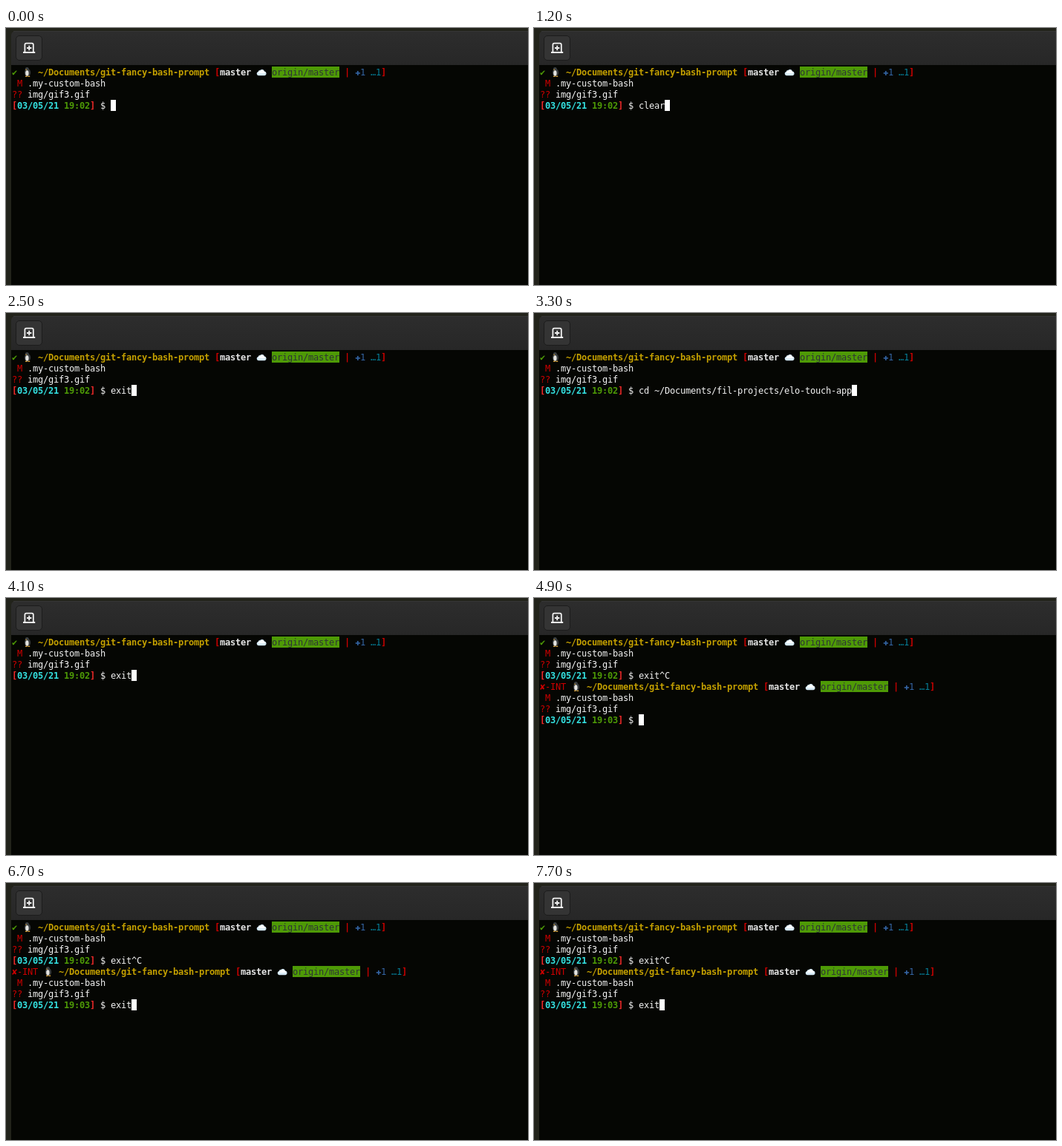
An HTML page for the animation above (8000 ms loop, 703 by 347 pixels).

```html
<!DOCTYPE html>
<html lang="en">
<head>
<meta charset="utf-8">
<title>Terminal history</title>
<style>
html, body { margin: 0; width: 100%; height: 100%; overflow: hidden; background: #22231b; }
svg { display: block; width: 703px; height: 347px; }
text { font: 12px "DejaVu Sans Mono", monospace; }
.bold { font-weight: bold; }
</style>
</head>
<body>
<svg viewBox="0 0 703 347" xmlns="http://www.w3.org/2000/svg">
  <defs>
    <linearGradient id="bar" x1="0" y1="0" x2="0" y2="1">
      <stop offset="0" stop-color="#2d2d2d"/>
      <stop offset="1" stop-color="#272727"/>
    </linearGradient>
    <g id="penguin">
      <ellipse cx="7" cy="8.3" rx="4.2" ry="5.4" fill="#34383a"/>
      <circle cx="6.3" cy="3.6" r="2.5" fill="#3c4042"/>
      <ellipse cx="6.4" cy="9" rx="2.2" ry="3.7" fill="#e4e4e0"/>
      <path d="M3.6 4.2l2.2-.6v1.5z" fill="#d9a032"/>
      <path d="M4 13.4h2.6M7.6 13.4h2.6" stroke="#d9a032" stroke-width="1.2"/>
    </g>
    <g id="cloud">
      <path d="M3 12.2a2.6 2.6 0 0 1-.4-5.1 2.5 2.5 0 0 1 2.6-2 3.4 3.4 0 0 1 5.8 1.4 2.9 2.9 0 0 1 .4 5.7z" fill="#d5e9f6"/>
      <path d="M3 9.2a2 2 0 0 1 2-2.6 3 3 0 0 1 5.2 0 2 2 0 0 1 1.6 2.6z" fill="#fafdff"/>
    </g>
  </defs>
  <rect width="703" height="347" fill="#22231b"/>
  <path d="M7 50V10a6 6 0 0 1 6-6H703V50z" fill="url(#bar)"/>
  <path d="M10 4.5H703" stroke="#363636"/>
  <rect x="7" y="50" width="696" height="297" fill="#050603"/>
  <rect x="13.5" y="10.5" width="35" height="33" rx="4.5" fill="#343434" stroke="#1c1c1c"/>
  <g fill="none" stroke="#f2f2f2" stroke-width="1.8">
    <path d="M25.4 33V22.6a2 2 0 0 1 2-2h7.4a2 2 0 0 1 2 2V33M23 33h16.2"/>
    <path d="M28 27h6.4M31.2 23.8v6.4"/>
  </g>
  <g id="first"></g>
  <g id="second"></g>
  <g id="live"></g>
  <rect id="cursor" width="7" height="15" fill="#fff"/>
</svg>
<script>
const NS = "http://www.w3.org/2000/svg";
const CELL = 7, LINE = 15, LEFT = 8, TOP = 52, LOOP = 8000, INPUT_COL = 19;
const RED = "#cc0000", LIGHT_RED = "#ef2929", GREEN = "#4e9a06", GOLD = "#c4a000",
      BLUE = "#3465a4", TEAL = "#06809a", CYAN = "#34e2e2", WHITE = "#f4f4f4";
const $ = id => document.getElementById(id);
const colX = col => LEFT + col * CELL;
const rowY = row => TOP + row * LINE;

function add(parent, tag, attrs) {
  const node = document.createElementNS(NS, tag);
  for (const key in attrs) node.setAttribute(key, attrs[key]);
  return parent.appendChild(node);
}

// Every character sits in its own terminal cell.
function write(parent, row, col, string, fill, bold) {
  const x = Array.from(string, (_, i) => colX(col + i)).join(" ");
  add(parent, "text", { x, y: rowY(row) + 12, fill, class: bold ? "bold" : "" }).textContent = string;
}

function prompt(parent, row, status, statusColor, time) {
  const shift = status.length + 1;
  const put = (col, ...rest) => write(parent, row, shift + col, ...rest);
  const icon = (name, col) => add(parent, "use",
    { href: "#" + name, x: colX(shift + col), y: rowY(row) });

  write(parent, row, 0, status, statusColor);
  icon("penguin", 0);
  put(3, "~/Documents/git-fancy-bash-prompt", GOLD, true);
  put(37, "[", RED, true);
  put(38, "master", "#e6e6e6", true);
  icon("cloud", 45);
  add(parent, "rect", { x: colX(shift + 48), y: rowY(row), width: 13 * CELL, height: LINE, fill: GREEN });
  put(48, "origin/master", "#2e3436");
  put(62, "|", RED, true);
  put(64, "✚1", BLUE);
  put(67, "…1", TEAL);
  put(69, "]", RED, true);

  write(parent, row + 1, 1, "M", RED);
  write(parent, row + 1, 3, ".my-custom-bash", WHITE);
  write(parent, row + 2, 0, "??", RED);
  write(parent, row + 2, 3, "img/gif3.gif", WHITE);

  write(parent, row + 3, 0, "[", LIGHT_RED, true);
  write(parent, row + 3, 1, "03/05/21", CYAN, true);
  write(parent, row + 3, 10, time, GREEN, true);
  write(parent, row + 3, 15, "]", LIGHT_RED, true);
  write(parent, row + 3, 17, "$", WHITE);
}

const PROJECTS = "cd ~/Documents/fil-projects/";
const APP = PROJECTS + "elo-touch-app";
const PROMPT_DIR = "cd ~/Documents/git-fancy-bash-prompt/";
const STATUS = "git status", LOG = "git log";
const INTERRUPT = 4800, SECOND_PROMPT = 4900, BLINK_OFF = 100, FIRST_KEY = 500;

// Command line contents, each valid from its start time.
const history = [
  [0, ""], [500, "clear"],
  [1000, "exit"], [1100, APP], [1200, "clear"], [1300, PROJECTS], [1400, "exit"],
  [1600, STATUS], [1700, "exit"], [1800, APP], [1900, "exit"],
  [2100, APP], [2200, "clear"], [2300, PROJECTS], [2400, "clear"], [2500, "exit"], [2600, APP],
  [2800, "exit"], [3000, STATUS], [3100, "exit"],
  [3300, APP], [3400, "clear"], [3600, PROJECTS], [3800, "clear"], [4000, APP], [4100, "exit"],
  [INTERRUPT, ""], [5400, "clear"], [5600, "exit"], [5700, "clear"],
  [5900, PROMPT_DIR], [6000, "clear"], [6500, LOG], [6600, "clear"], [6700, "exit"],
  [6900, APP], [7000, "clear"], [7600, APP], [7700, "exit"]
];

prompt($("first"), 0, "✔", GREEN, "19:02");
prompt($("second"), 4, "✘-INT", RED, "19:03");

function render(t) {
  const command = history.findLast(([start]) => start <= t)[1];
  const interrupted = t >= INTERRUPT;
  const ready = t >= SECOND_PROMPT;
  const waiting = interrupted && !ready;
  const live = $("live"), cursor = $("cursor");

  live.replaceChildren();
  if (interrupted) write(live, 3, INPUT_COL, "exit^C", WHITE);
  const row = waiting ? 4 : ready ? 7 : 3;
  if (command) write(live, row, INPUT_COL, command, WHITE);

  $("second").style.display = ready ? "" : "none";
  cursor.setAttribute("x", colX(waiting ? 0 : INPUT_COL + command.length));
  cursor.setAttribute("y", rowY(row));
  cursor.style.display = t >= BLINK_OFF && t < FIRST_KEY ? "none" : "";
}

const origin = performance.now();
function tick() {
  render((performance.now() - origin) % LOOP);
  requestAnimationFrame(tick);
}
tick();
</script>
</body>
</html>
```
